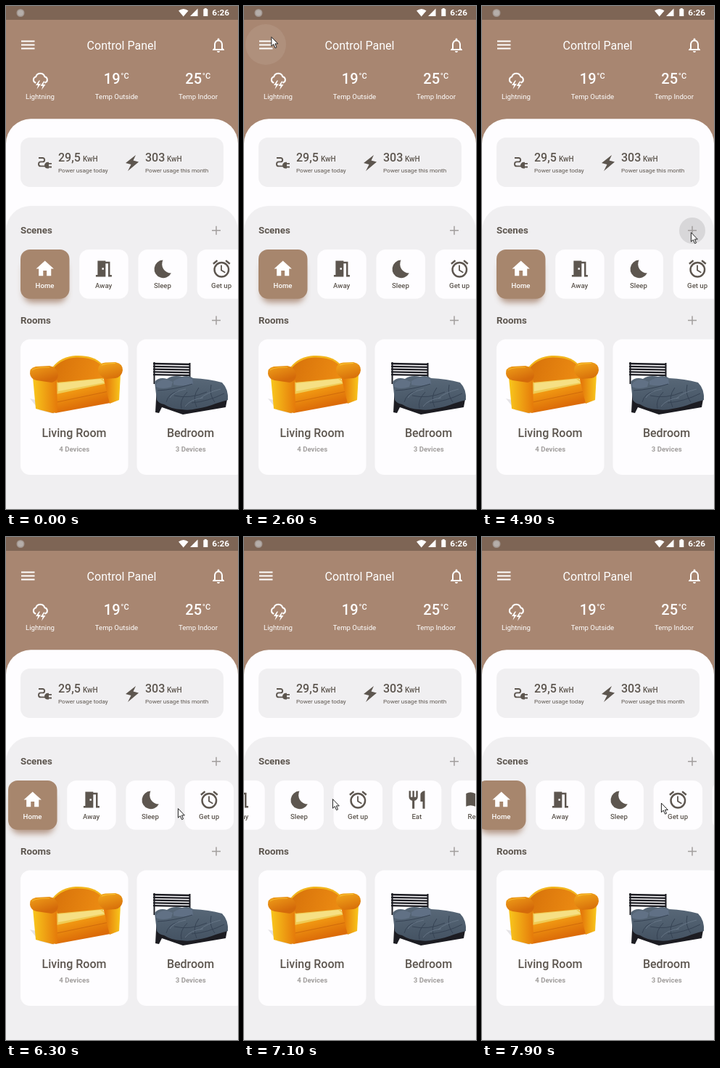
Animation of 320 by 692 pixels, one loop 8000 ms. Source, as an HTML page with a canvas:

```html
<!DOCTYPE html>
<html lang="en">
<head>
<meta charset="utf-8">
<title>Control Panel</title>
<style>
  html, body { margin: 0; width: 100%; height: 100%; overflow: hidden; background: #f0eff1; }
  canvas { display: block; width: 320px; height: 692px; }
</style>
</head>
<body>
<canvas id="stage"></canvas>
<script>
const W = 320, H = 692, LOOP = 8000, STEP = 100;
const BROWN = '#a88671', WHITE = '#fefdff', GRAY = '#f0eff1', INK = '#5d564f', FAINT = '#a19e9d';
const canvas = document.getElementById('stage');
const ctx = canvas.getContext('2d');
const dpr = window.devicePixelRatio || 1;
canvas.width = W * dpr;
canvas.height = H * dpr;

const ICONS = {
  bell: 'M12 22c1.1 0 2-.9 2-2h-4c0 1.1.9 2 2 2zm6-6v-5c0-3.07-1.63-5.64-4.5-6.32V4c0-.83-.67-1.5-1.5-1.5s-1.5.67-1.5 1.5v.68C7.64 5.36 6 7.92 6 11v5l-2 2v1h16v-1zm-2 1H8v-6c0-2.48 1.51-4.5 4-4.5s4 2.02 4 4.5z',
  home: 'M10 20v-6h4v6h5v-8h3L12 3 2 12h3v8z',
  door: 'M14 6v15H3v-2h2V3h9v1h5v15h2v2h-4V6zm-4 5v2h2v-2z',
  moon: 'M12.300 2.200A10.100 10.100 0 1 0 21.600 16.900A10.200 10.200 0 0 1 12.300 2.200Z',
  alarm: 'M22 5.72l-4.6-3.86-1.29 1.53 4.6 3.86zM7.88 3.39L6.6 1.86 2 5.71l1.29 1.53zM12.5 8H11v6l4.75 2.85.75-1.23-4-2.37zM12 4a9 9 0 1 0 0 18a9 9 0 0 0 0-18zm0 16a7 7 0 1 1 0-14a7 7 0 0 1 0 14z',
  cutlery: 'M11 9H9V2H7v7H5V2H3v7c0 2.12 1.66 3.84 3.75 3.97V22h2.5v-9.03C11.34 12.84 13 11.12 13 9V2h-2zm5-3v8h2.5v8H21V2c-2.76 0-5 2.24-5 4z',
  book: 'M1 5Q6 2 11.5 5V19.5Q6 17 1 19.5ZM12.5 5Q18 2 23 5V19.5Q18 17 12.5 19.5ZM14 6.5V17Q18 16 21.5 17V6.5Q18 4.5 14 6.5Z'
};
const SCENES = [['home', 'Home'], ['door', 'Away'], ['moon', 'Sleep'], ['alarm', 'Get up'], ['cutlery', 'Eat'], ['book', 'Read']];
const LIGHTEN = 'rgba(255,255,255,.08)', DARKEN = 'rgba(0,0,0,.1)';
const BUTTONS = [[30, 53, 28, LIGHTEN], [293, 54, 28, LIGHTEN], [290, 309, 18, DARKEN]];

// [time, x, y]
const POINTER = [
  [1500, 45, 4], [1700, 41.5, 22.5], [2300, 40, 24], [2450, 36, 48], [2650, 38, 40], [2800, 80, 20],
  [3000, 190, 12], [3200, 292, 20], [3300, 293, 48], [3400, 293, 57], [3600, 293, 60],
  [4100, 291, 169], [4700, 288, 306], [4900, 288, 311], [5100, 287, 313], [5500, 268, 348],
  [5900, 250, 372], [6150, 253, 373], [6300, 237, 373], [7000, 122, 361], [7100, 122, 360],
  [7250, 135, 360], [7900, 247, 365.5]
];
// [time, scroll]
const SCROLL = [[6150, 0], [6300, 17], [7000, 136], [7100, 140], [7250, 140], [7900, 27]];

function sample(track, t, i) {
  if (t <= track[0][0]) return track[0][i];
  for (let k = 1; k < track.length; k++) {
    const a = track[k - 1], b = track[k];
    if (t <= b[0]) return a[i] + (b[i] - a[i]) * (t - a[0]) / (b[0] - a[0]);
  }
  return track[track.length - 1][i];
}

function text(str, x, y, size, color = INK, weight = 400, align = 'left') {
  ctx.font = `${weight} ${size}px Roboto, sans-serif`;
  ctx.textAlign = align;
  ctx.fillStyle = color;
  ctx.fillText(str, x, y);
}

function box(x, y, w, h, r, color) {
  ctx.fillStyle = color;
  ctx.beginPath();
  ctx.roundRect(x, y, w, h, r);
  ctx.fill();
}

function disc(x, y, r, color) {
  ctx.fillStyle = color;
  ctx.beginPath();
  ctx.arc(x, y, r, 0, Math.PI * 2);
  ctx.fill();
}

function fill(d, color) {
  ctx.fillStyle = color;
  ctx.fill(new Path2D(d), 'evenodd');
}

function line(d, color, width = 1) {
  ctx.strokeStyle = color;
  ctx.lineWidth = width;
  ctx.stroke(new Path2D(d));
}

function at(x, y, scale, draw) {
  ctx.save();
  ctx.translate(x, y);
  ctx.scale(scale, scale);
  draw();
  ctx.restore();
}

function icon(name, cx, cy, scale, color) {
  at(cx - 12 * scale, cy - 12 * scale, scale, () => fill(ICONS[name], color));
}

function gradient(x0, y0, x1, y1, from, to) {
  const g = ctx.createLinearGradient(x0, y0, x1, y1);
  g.addColorStop(0, from);
  g.addColorStop(1, to);
  return g;
}

function statusBar() {
  ctx.fillStyle = '#7e6555';
  ctx.fillRect(0, 0, W, 19);
  disc(20, 9.5, 5.5, '#a1958e');
  disc(20, 9.5, 4, '#b5aeaa');
  fill('M238 6.5Q244.700 1.500 251.500 6.500L244.700 14.500Z', '#fff');
  fill('M264.500 3.500V14H254Z', '#fff');
  fill('M273.700 3h3v1.200h1.600v9.800h-6v-9.800h1.400z', '#fff');
  text('6:26', 308, 13.3, 11.8, '#fff', 700, 'right');
}

function header() {
  for (let i = 0; i < 3; i++) box(21, 47.500 + i * 5, 18.500, 2, 0, '#fff');
  text('Control Panel', 159.500, 60, 16, '#fff', 400, 'center');
  icon('bell', 293, 54, 1, '#fff');

  ctx.lineCap = 'round';
  line('M40.500 105.500A4.400 4.400 0 0 1 41.300 97.200A6.300 6.300 0 0 1 53.300 97.200A4.300 4.300 0 0 1 54 105.500', '#fff', 2);
  ctx.lineCap = 'butt';
  const bolt = 'M45.500 102.500l-4.500 6.500h3.200l-1.700 5.500 5.500-7.500h-3.300l2.300-4.500z';
  fill(bolt, '#fff');
  at(6.500, 1, 1, () => fill(bolt, '#fff'));
  text('Lightning', 47, 128.200, 9.7, '#fff', 400, 'center');
  [['19', 'Temp Outside', 152.500], ['25', 'Temp Indoor', 265]].forEach(([value, label, x]) => {
    text(value, x + 5, 107, 20, '#fff', 500, 'right');
    text('°C', x + 5.800, 99.500, 11, '#fff', 500);
    text(label, x, 128.200, 9.6, '#fff', 400, 'center');
  });
}

function powerCard() {
  box(20, 181, 280, 68, 13, GRAY);
  line('M45 209h5.500a2.700 2.700 0 0 1 0 5.400h-2.500a3 3 0 0 0 0 6h6', INK, 1.900);
  fill('M53 219.500a4.500 4.500 0 0 1 4.500-4.700h1.500v1.200h4v1.800h-4v2.800h4v1.800h-4v1.200h-1.500a4.500 4.500 0 0 1-4.500-4.100z', INK);
  fill('M179 205L165 216L172.500 218L168 227L183 214.500L175.500 212.500Z', INK);
  [['29,5', 'today', 72, 106], ['303', 'this month', 192, 222]].forEach(([value, span, x, unitX]) => {
    text(value, x, 214.300, 16, INK, 500);
    text('KwH', unitX, 214.300, 10, INK, 500);
    text('Power usage ' + span, x, 229, 8.1);
  });
}

function section(title, baseline) {
  text(title, 20, baseline, 13.3, INK, 700);
  const y = baseline - 4.500;
  line(`M284 ${y}H296M290 ${y - 6}V${y + 6}`, FAINT, 1.500);
}

function scenes(scroll) {
  SCENES.forEach(([name, label], i) => {
    const x = 20 + i * 81.2 - scroll, active = i === 0;
    if (active) {
      ctx.save();
      ctx.shadowColor = 'rgba(168,134,113,.85)';
      ctx.shadowBlur = 8 * dpr;
      ctx.shadowOffsetY = 7 * dpr;
      box(x + 4, 343, 59.5, 58, 12, BROWN);
      ctx.restore();
    }
    box(x, 335, 67.5, 67.8, 13, active ? '#a7866d' : WHITE);
    const color = active ? '#fff' : INK;
    icon(name, x + 33.700, 361.500, 1.22, color);
    text(label, x + 33.500, 388, 9.6, color, 500, 'center');
  });
}

function sofa() {
  fill('M33 540L46 556L66 561L74 550Z', 'rgba(90,85,80,.15)');
  // Back rest
  fill('M64 497Q76 482 96 481Q120 480 132 492L135 513L70 519Z', '#f2b51c');
  fill('M65 499Q77 484.500 97 483.500Q120 483 131 494L134 513L71 518Z', gradient(70, 490, 132, 510, '#d9740b', '#ec8b12'));
  // Seat
  fill('M70 518L133 512L139 520L70 535Z', '#efcb55');
  fill('M72 519L130 513L136 518L72 530Z', '#f6e084');
  fill('M69 534L140 519L144 546L68 560Z', gradient(69, 534, 76, 560, '#f29a12', '#dc6c08'));
  line('M70 545L142 530', '#c9650b', .8);
  // Left arm
  fill('M37 511L70 511L71 559L64 560L41 554Z', gradient(38, 530, 71, 530, '#f8c51c', '#e57a0a'));
  fill('M33 506Q32 498 41 496L60 495Q71 497 72 508Q71 516 63 518L42 515Q34 513 33 506Z', gradient(40, 495, 48, 518, '#ee9b18', '#d46a0a'));
  line('M36 501Q40 497 60 497', '#f5b62a', 1.200);
  // Right arm
  fill('M134 510L158 507L156 542L143 547Z', gradient(138, 520, 157, 520, '#e57a0b', '#f8c41b'));
  fill('M127 500Q128 491 137 490.500L151 490Q161 492 161 501Q160 510 151 512L138 513Q128 510 127 500Z', gradient(140, 490, 146, 513, '#f1a31a', '#d8700a'));
  line('M132 494Q138 491.500 151 491.500', '#f8c431', 1.200);
}

function bed() {
  const dark = '#1c1c22';
  line('M204.500 490V520M253.500 491V516', dark, 2);
  for (let i = 0; i < 5; i++) line(`M203 ${492 + i * 3.8}L254 ${493 + i * 3.8}`, dark, 2.300);
  fill('M208 522L206 559L211 560L215 552L244 562L303 552L306 536Z', dark);
  fill('M205 517Q211 510 222 513Q230 507 243 510Q252 507 258 512Q280 513 298 518Q307 527 306 542Q298 544 289 547Q277 552 263 554Q252 557 242 555Q229 555 218 548Q211 547 208 542Z', gradient(250, 508, 250, 558, '#596979', '#435161'));
  fill('M207 520Q216 510 230 517L228 524Q216 528 207 524Z', '#617185');
  fill('M231 516Q243 508 257 513L258 520Q244 524 231 521Z', '#607085');
  line('M209 529Q231 528 257 520M221 545Q224 533 237 530M242 554Q239 542 250 531M263 552Q256 538 266 525M288 545Q280 535 283 521M232 536Q254 541 277 531M256 546Q279 544 301 533', '#364354', 1);
  line('M226 539Q231 530 248 527M268 540Q276 532 296 527M247 551Q254 541 272 539', '#6c7c8d', .8);
}

function rooms() {
  [['Living Room', 4, 20], ['Bedroom', 3, 180.500]].forEach(([name, count, x]) => {
    box(x, 458.500, 148.500, 186.500, 13, WHITE);
    text(name, x + 74, 593, 16, INK, 500, 'center');
    text(count + ' Devices', x + 74.200, 613, 9.6, FAINT, 700, 'center');
  });
  sofa();
  bed();
}

function hover(x, y) {
  BUTTONS.forEach(([cx, cy, r, tint]) => {
    if (Math.abs(x - cx) < r && Math.abs(y - cy) < r) disc(cx, cy, r, tint);
  });
}

function pointer(x, y) {
  at(x, y, 1, () => {
    const arrow = 'M.4 .6V13.200L3.300 10.600L5.500 15.700L7.500 14.800L5.400 9.900H9.300Z';
    fill(arrow, '#fff');
    line(arrow, '#222', 1);
  });
}

function draw(t) {
  const x = sample(POINTER, t, 1), y = sample(POINTER, t, 2);
  const shown = t >= POINTER[0][0];
  ctx.setTransform(dpr, 0, 0, dpr, 0, 0);
  ctx.fillStyle = BROWN;
  ctx.fillRect(0, 0, W, H);
  statusBar();
  box(0, 155.3, W, H, 34, WHITE);
  box(0, 275, W, H, 34, GRAY);
  if (shown) hover(x, y);
  header();
  powerCard();
  section('Scenes', 313.300);
  section('Rooms', 437);
  scenes(sample(SCROLL, t, 1));
  rooms();
  if (shown) pointer(x, y);
}

const start = performance.now();
function tick() {
  const t = (performance.now() - start) % LOOP;
  draw(Math.floor(t / STEP) * STEP);
  requestAnimationFrame(tick);
}
tick();
</script>
</body>
</html>
```
